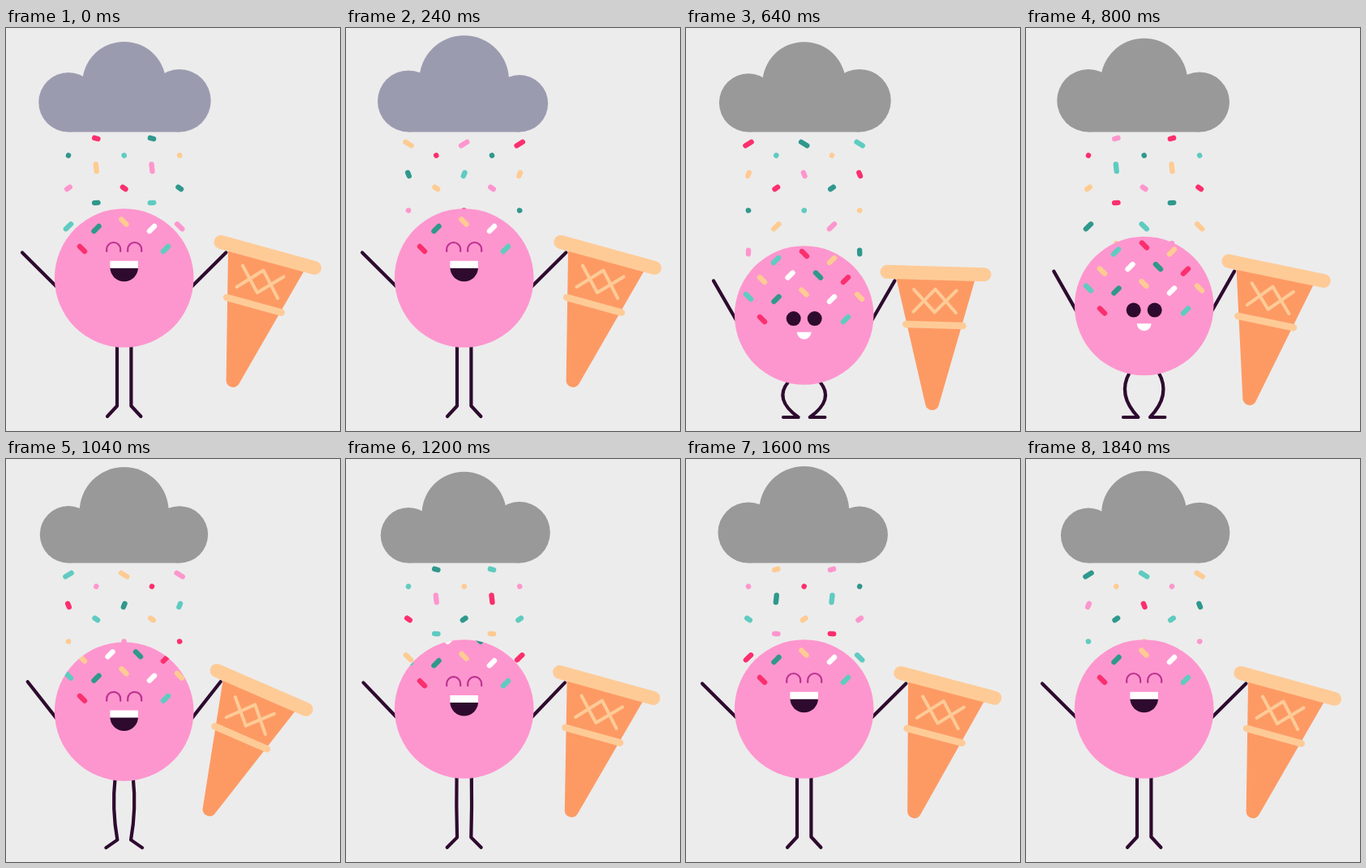
Write an HTML page with a canvas that moves like this. It is 412 px wide and 498 px high and loops after 1.92 s.

```html
<!DOCTYPE html>
<html lang="en">
<head>
<meta charset="utf-8">
<title>Sprinkle shower</title>
<style>
html, body { margin: 0; width: 100%; height: 100%; overflow: hidden; background: #ececec; }
canvas { display: block; }
</style>
</head>
<body>
<canvas id="stage" width="412" height="498"></canvas>
<script>
const ctx = document.getElementById('stage').getContext('2d');
const LOOP = 1920, STEP = 80, TAU = Math.PI * 2;
const MID = 145.7, REST = 309, R = 85.8;
const INK = '#2e0a2f', CREAM = '#fecb97';
const COLORS = { D: '#2f988c', T: '#fecb92', R: '#fb2f6e', A: '#5fcbc1', P: '#fd96ce', W: '#ffffff' };
const ORDER = 'DTRAP';

// Falling columns: x, steps already fallen, colour offset, spin direction per sprinkle
const COLUMNS = [
  [77, 4, 0, '+-++-'],
  [111.3, 1, 2, '-++-+'],
  [145.7, 4, 3, '-+--+'],
  [180, 1, 0, '-++-+'],
  [214.2, 4, 1, '-+--+']
];

// Sprinkles on the doughnut: x, y, colour, lean
const TOPPING = [
  [111, 200, 'A', 1], [146, 192, 'R', -1], [180, 200, 'T', 1],
  [128.5, 218.5, 'W', 1], [163, 218.5, 'D', -1],
  [94, 224, 'T', -1], [197, 224, 'R', 1],
  [77, 245, 'A', -1], [214, 245, 'T', -1],
  [111.5, 248, 'D', 1], [145.5, 239.5, 'T', -1], [180, 248, 'W', 1],
  [94, 273, 'R', -1], [197, 273, 'A', 1]
];

// Value over time from [time, value] keys with sine easing
function track(keys, t) {
  for (let i = 1; i < keys.length; i++) {
    const [t0, a] = keys[i - 1], [t1, b] = keys[i];
    if (t < t1) return a + (b - a) * (1 - Math.cos(Math.PI * (t - t0) / (t1 - t0))) / 2;
  }
  return keys[keys.length - 1][1];
}

const SINK = [[0, 0], [240, 0], [640, 46], [1120, 0]];
const NOD = [[0, 0], [240, 0], [720, 44], [1320, 0]];
const TILT = [[0, 15.4], [240, 15.4], [560, 0], [1040, 23.5], [1320, 10.5], [1680, 15.4]];

function line(points, color, width) {
  ctx.beginPath();
  points.forEach(([x, y]) => ctx.lineTo(x, y));
  ctx.strokeStyle = color;
  ctx.lineWidth = width;
  ctx.stroke();
}

function disc(x, y, r, color) {
  ctx.beginPath();
  ctx.arc(x, y, r, 0, TAU);
  ctx.fillStyle = color;
  ctx.fill();
}

function sprinkle(x, y, angle, length, color) {
  const dx = Math.cos(angle) * length / 2, dy = -Math.sin(angle) * length / 2;
  line([[x - dx, y - dy], [x + dx, y + dy]], color, 6.4);
}

function rain(step) {
  for (const [x, lead, shift, spins] of COLUMNS) {
    for (let j = -4; j <= 5; j++) {
      const n = step + lead - 5 * j;
      if (n < -1 || n >= 19) continue;
      const k = (j + 5) % 5;
      const spin = spins[k] === '+' ? 1 : -1;
      const length = 4.4 + 4.1 * Math.cos(TAU * (n - 2) / 4);
      sprinkle(x, 130 + 6.3 * n + 0.138 * n * n, spin * n * 16 * Math.PI / 180,
        length, COLORS[ORDER[(k + shift) % 5]]);
    }
  }
}

function cloud(step, t) {
  const wave = peak => Math.cos(TAU * (step - peak) * 3 / 25);
  const color = t < 360 ? '#9b9bb0' : '#999999';
  const base = 128.5;
  const left = 36.4 + 2.4 * wave(1.9);
  const middle = 53.5 + 2.1 * wave(3.65);
  const right = 36.8 + 2 * wave(-0.3);
  disc(77, base - left, left, color);
  disc(MID, 120 - middle, middle, color);
  disc(214, base - right, right, color);
  ctx.fillRect(77, 88, 137, base - 88);
}

function legs(cy, bend) {
  const hip = cy + 82, ankle = Math.min(481, 467 + bend);
  for (const side of [1, -1]) {
    const at = x => MID + side * (x - MID);
    ctx.beginPath();
    ctx.moveTo(at(137 - 0.65 * bend), hip);
    ctx.quadraticCurveTo(at(137 - 1.8 * bend), (hip + ankle) / 2, at(137 + 0.1 * bend), ankle);
    ctx.lineTo(at(Math.max(120, 125 - 0.45 * bend)), Math.min(481, 480 + bend * 0.1));
    ctx.strokeStyle = INK;
    ctx.lineWidth = 4.2;
    ctx.stroke();
  }
}

function cone(x, y, degrees) {
  ctx.save();
  ctx.translate(x, y);
  ctx.rotate(degrees * Math.PI / 180);
  const c = 50.3;
  ctx.fillStyle = '#fd9a64';
  ctx.beginPath();
  ctx.moveTo(1.4, -5);
  ctx.lineTo(c - 8.2, 152);
  ctx.arc(c, 150, 8.5, Math.PI - 0.27, 0.27, true);
  ctx.lineTo(99.2, -5);
  ctx.fill();
  line([[24, 10], [c, 37.5], [76.5, 10]], CREAM, 4);
  line([[24, 37.5], [c, 9], [76.5, 37.5]], CREAM, 4);
  line([[15.3, 53.3], [85.6, 53.3]], CREAM, 8.5);
  line([[-9.7, -10.8], [110.3, -10.8]], CREAM, 17);
  ctx.restore();
}

function halfDisc(y, r, color) {
  ctx.beginPath();
  ctx.arc(MID, y, r, 0, Math.PI);
  ctx.fillStyle = color;
  ctx.fill();
}

function face(happy) {
  for (const x of [132.7, 158.7]) {
    if (!happy) {
      disc(x, 272, 9, INK);
      continue;
    }
    ctx.beginPath();
    ctx.moveTo(x - 8.5, 276);
    ctx.arc(x, 273.5, 8.5, Math.PI, 0);
    ctx.lineTo(x + 8.5, 276);
    ctx.strokeStyle = '#bd3292';
    ctx.lineWidth = 2.2;
    ctx.stroke();
  }
  if (happy) {
    halfDisc(296, 17.3, INK);
    ctx.fillStyle = '#ffffff';
    ctx.fillRect(MID - 17.3, 287.8, 34.6, 9);
  } else {
    halfDisc(288.7, 8.9, '#ffffff');
  }
}

function doughnut(cy, nod, happy) {
  disc(MID, cy, R, '#fd96ce');
  ctx.save();
  ctx.clip();
  ctx.translate(0, cy - REST + nod);
  for (const [x, y, c, lean] of TOPPING) sprinkle(x, y, lean * Math.PI / 4, 8.5, COLORS[c]);
  face(happy);
  ctx.restore();
}

function draw(t) {
  const step = t / STEP;
  const sink = track(SINK, t), nod = track(NOD, t);
  const cy = REST + sink;
  const reach = 125.7 - 0.34 * nod, handY = cy - 31.5 - 0.27 * nod;
  const shoulderY = cy + 10 - 0.11 * nod;

  ctx.fillStyle = '#ececec';
  ctx.fillRect(0, 0, 412, 498);
  ctx.lineCap = 'round';
  ctx.lineJoin = 'round';

  rain(step);
  cloud(step, t);
  legs(cy, 0.22 * sink + 0.15 * nod);
  for (const side of [1, -1]) {
    line([[MID + side * reach, handY], [MID + side * 84, shoulderY]], INK, 4.2);
  }
  cone(MID + reach, handY, track(TILT, t));
  doughnut(cy, nod, t < 360 || t > 920);
}

const start = performance.now();
function tick() {
  const t = (performance.now() - start) % LOOP;
  draw(Math.floor(t / STEP) * STEP);
  requestAnimationFrame(tick);
}
tick();
</script>
</body>
</html>
```
